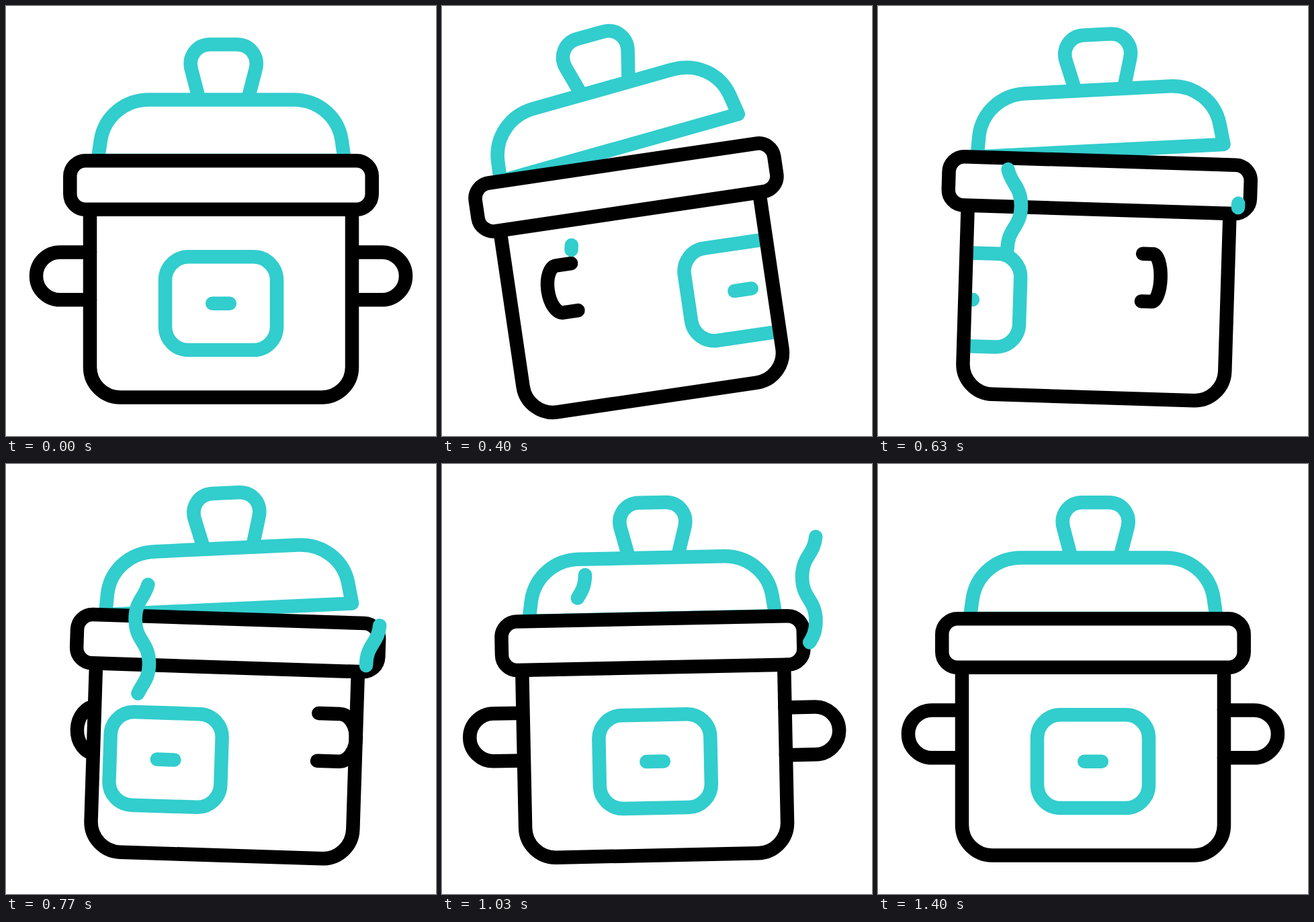
Animation of 640 by 640 pixels, one loop 1.67 s. Source, as an HTML page:

```html
<!DOCTYPE html>
<html lang="en">
<head>
<meta charset="utf-8">
<title>Cooking pot</title>
<style>
  html, body { margin: 0; height: 100%; overflow: hidden; background: #fff; }
  svg { display: block; width: 100vw; height: 100vh; }
  .ink, .teal { fill: none; stroke: #000; stroke-width: 20.5; stroke-linecap: round; stroke-linejoin: round; }
  .teal { stroke: #32cdcd; }
  .solid { fill: #fff; }
</style>
</head>
<body>
<svg viewBox="0 0 640 640">
  <clipPath id="inside">
    <path d="M125 302V537.5a45 45 0 0 0 45 45H470a45 45 0 0 0 45-45V302Z"/>
  </clipPath>
  <g id="pot">
    <path id="back" class="ink"/>
    <path class="solid" d="M125 302V537.5a45 45 0 0 0 45 45H470a45 45 0 0 0 45-45V302Z"/>
    <g clip-path="url(#inside)">
      <g id="panel" class="teal">
        <rect x="237" y="373.3" width="166" height="138.7" rx="34.5"/>
        <path d="M307.2 442.7H332.8"/>
      </g>
    </g>
    <path class="ink" d="M125 302V537.5a45 45 0 0 0 45 45H470a45 45 0 0 0 45-45V302"/>
    <path id="front" class="ink"/>
    <g id="lid" class="teal">
      <path d="M287.5 139L276 95C270.5 75 284 57.3 304 57.3H343.4C363.4 57.3 376.9 75 371.4 95L360 139"/>
      <path d="M136.5 230L141 199C147 164 177 139.5 213 139.5H428C464 139.5 494 164 499.5 199L504 230Z"/>
    </g>
    <rect class="ink solid" style="fill:#fff" x="95.3" y="230.3" width="449.4" height="72.4" rx="23"/>
  </g>
  <path id="steamL" class="teal" pathLength="1"/>
  <path id="steamR" class="teal" pathLength="1"/>
</svg>
<script>
const LOOP = 1670, FPS = 30;
const el = id => document.getElementById(id);
const clamp = v => Math.min(1, Math.max(0, v));

// Monotone cubic through [frame, value] keys; flat at peaks and ends.
function track(...keys) {
  const slope = i => (keys[i + 1][1] - keys[i][1]) / (keys[i + 1][0] - keys[i][0]);
  const tan = keys.map((k, i) => {
    if (!i || i === keys.length - 1) return 0;
    const a = slope(i - 1), b = slope(i);
    return a * b > 0 ? 2 * a * b / (a + b) : 0;
  });
  return f => {
    let i = 0;
    while (i < keys.length - 2 && f > keys[i + 1][0]) i++;
    const [x0, y0] = keys[i], [x1, y1] = keys[i + 1];
    const d = x1 - x0, u = clamp((f - x0) / d), v = 1 - u;
    return y0 * v * v * (1 + 2 * u) + y1 * u * u * (3 - 2 * u)
      + d * u * v * (tan[i] * v - tan[i + 1] * u);
  };
}

const sway = track([7.1, 0], [12.5, -8.6], [20.8, 3.2], [27.6, -2.3], [34.6, 0]);
const tilt = track([7.2, 0], [13.2, -8.2], [21.5, -3.7], [26, -6.7], [31, 0]);
const turn = track([7.5, 0], [8, 0.002], [12, 0.25], [16, 0.5], [23, 0.855], [30, 1]);
const backSide = track([7.5, 1], [8, 0.996], [12, 0.45], [16, 0], [23, -0.8], [27.5, -1]);

// side runs from -1 (left) to 1 (right), squeezed towards the middle.
function handle(side) {
  const x = n => 320 + n * side;
  const r = Math.max(0.01, Math.abs(35.4 * side));
  return `M${x(195)} 366.5H${x(239.6)}A${r} 35.4 0 0 ${side > 0 ? 1 : 0} ${x(239.6)} 437.3H${x(195)}`;
}

function steam(id, x, y, headStart, tailStart) {
  const path = el(id), h = 33;
  path.setAttribute("d", `M${x} ${y}c0 ${-h} 20.5 ${-h} 20.5 ${-2 * h}`
    + `s-20.5 ${-h} -20.5 ${-2 * h}s20.5 ${-h} 20.5 ${-2 * h}`);
  const head = track([headStart, 0], [headStart + 15, 1]);
  const tail = track([tailStart, 0], [tailStart + 15, 1]);
  return f => {
    const a = tail(f), len = head(f) - a;
    path.style.visibility = len > 0.0001 ? "visible" : "hidden";
    path.setAttribute("stroke-dasharray", `${len} 3`);
    path.setAttribute("stroke-dashoffset", -a);
  };
}

const puffs = [steam("steamL", 192.5, 363, 10.4, 20), steam("steamR", 536, 300, 17.5, 27)];

function draw(f) {
  const p = turn(f);
  el("pot").setAttribute("transform", `rotate(${sway(f)} 320 582)`);
  el("lid").setAttribute("transform", `rotate(${tilt(f)} 137 230)`);
  el("panel").setAttribute("transform", `translate(${600 * (p < 0.5 ? p : p - 1)})`);
  el("front").setAttribute("d", handle(2 * p - 1));
  el("back").setAttribute("d", handle(backSide(f)));
  puffs.forEach(puff => puff(f));
}

const start = performance.now();
function tick() {
  const t = (performance.now() - start) % LOOP;
  draw(Math.floor(t * FPS / 1000 + 0.11));
  requestAnimationFrame(tick);
}
tick();
</script>
</body>
</html>
```
